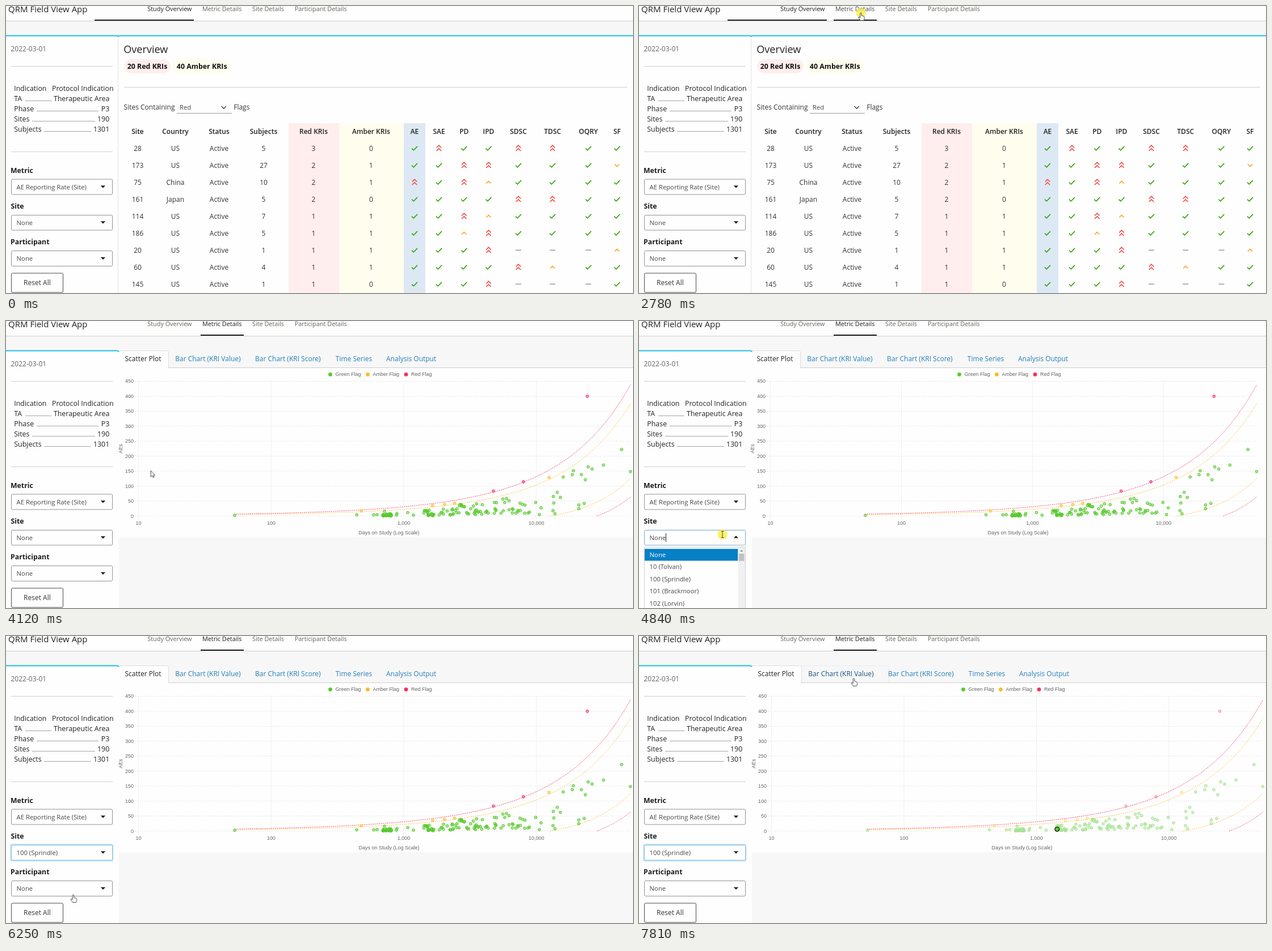
Write an HTML page that moves like this. It is 1105x507 px and loops after 8 s.

```html
<!DOCTYPE html>
<html lang="en">
<head>
<meta charset="utf-8">
<title>Study dashboard</title>
<style>
html, body { margin: 0; width: 100%; height: 100%; overflow: hidden; background: #f7f7f7; }
svg { display: block; width: 1105px; height: 507px; }
text { font-family: "Open Sans", "Noto Sans", sans-serif; font-size: 12px; fill: #333; white-space: pre; }
.nav text { font-size: 10.85px; fill: #63655c; }
.facts text { font-size: 12.4px; fill: #222; }
.label { font-size: 12.3px; font-weight: 700; fill: #1d1d1d; }
.input { font-size: 11.28px; fill: #484848; }
.badge { font-size: 12.4px; font-weight: 700; fill: #111; }
.head { font-weight: 600; fill: #222; }
.tabs text { fill: #2580bd; }
.chart text { font-family: "Liberation Sans", Arial, sans-serif; font-size: 9px; fill: #666; }
.mid { text-anchor: middle; }
.end { text-anchor: end; }
.rule { stroke: #cfcfcf; }
.box { fill: #fefefe; stroke: #929292; }
.icon, .line { fill: none; }
.icon { stroke-width: 1.7; }

.k { animation: 8s step-end infinite; }
@keyframes overview { 0% { opacity: 1 } 39.75%, to { opacity: 0 } }
@keyframes metrics { 0% { opacity: 0 } 39.75%, to { opacity: 1 } }
@keyframes studyLine { 0% { opacity: 1 } 40.625%, to { opacity: 0 } }
@keyframes studyText { 0% { fill: #1d1d1d } 40.625%, to { fill: #63655c } }
@keyframes metricLine { 0% { opacity: 0 } 20.5%, to { opacity: 1 } }
@keyframes metricText { 0% { fill: #63655c } 20.5% { fill: #45463f } 40.625%, to { fill: #1d1d1d } }
@keyframes wide { 0% { opacity: 0 } 40.625% { opacity: 1 } 60.5% { opacity: 0 } 78.125% { opacity: 1 } 80.625%, to { opacity: 0 } }
@keyframes data { 0% { opacity: 0 } 42.25%, to { opacity: 1 } }
@keyframes open { 0% { opacity: 0 } 60.5% { opacity: 1 } 78.125%, to { opacity: 0 } }
@keyframes picked { 0% { opacity: 0 } 80.625%, to { opacity: 1 } }
@keyframes noSite { 0% { opacity: 1 } 78.125%, to { opacity: 0 } }
@keyframes oneSite { 0% { opacity: 0 } 78.125%, to { opacity: 1 } }
@keyframes closed { 0% { opacity: 1 } 60.5% { opacity: 0 } 78.125%, to { opacity: 1 } }
@keyframes focus { 0% { stroke: #929292 } 60.5% { stroke: #74a9cc } 61.25%, to { stroke: #86bfe4 } }
@keyframes glow { 0% { opacity: 0 } 61.25%, to { opacity: 1 } }
@keyframes caret { 0% { opacity: 0 } 60.5% { opacity: 1 } 67.1% { opacity: 0 } 73.7% { opacity: 1 } 78.125%, to { opacity: 0 } }
@keyframes shift { 0% { transform: none } 60.5% { transform: translate(-2px, 0) } 78.125%, to { transform: none } }
@keyframes hover { 0% { fill: #2580bd } 95.125%, to { fill: #1b5487 } }
@keyframes hoverBox { 0% { opacity: 0 } 95.125%, to { opacity: 1 } }
@keyframes click {
  0% { opacity: 0 } 34.75% { opacity: 1 } 39.75% { opacity: 0 } 58.5% { opacity: 1 }
  62.125% { opacity: 0 } 75.625% { opacity: 1 } 78.125%, to { opacity: 0 }
}
@keyframes arrow {
  0% { opacity: 0 } 10.5% { opacity: 1 } 18.5% { opacity: 0 } 49% { opacity: 1 }
  57% { opacity: 0 } 86.25% { opacity: 1 } 94.75%, to { opacity: 0 }
}
@keyframes hand {
  0% { opacity: 0 } 18.5% { opacity: 1 } 49% { opacity: 0 } 65.5% { opacity: 1 }
  86.25% { opacity: 0 } 94.75%, to { opacity: 1 }
}
@keyframes beam { 0% { opacity: 0 } 57% { opacity: 1 } 65.5%, to { opacity: 0 } }
#cursor { animation: path 8s linear infinite; }
@keyframes path {
  0%, 10.5% { transform: translate(963px, 495px) }
  14% { transform: translate(690px, 230px) }
  17% { transform: translate(440px, 45px) }
  18.875% { transform: translate(395.5px, 15.5px) }
  20.5%, 21.25% { transform: translate(393px, 14px) }
  22.25%, 48% { transform: translate(391px, 12px) }
  51.5% { transform: translate(255.5px, 264px) }
  54% { transform: translate(183px, 345px) }
  57.625%, 63.875% { transform: translate(147px, 377px) }
  68.125%, 71.5% { transform: translate(139px, 442px) }
  75.625%, 85.625% { transform: translate(118.5px, 457px) }
  89.5% { transform: translate(640px, 385px) }
  91% { transform: translate(812px, 300px) }
  93.8% { transform: translate(415px, 168px) }
  95.125%, 96.5% { transform: translate(421px, 77px) }
  97.625%, to { transform: translate(378.5px, 75px) }
}
</style>
</head>
<body>
<svg viewBox="0 0 1105 507">
  <rect width="1105" height="507" fill="#f7f7f7"/>

  <g class="nav">
    <rect width="1105" height="26" fill="#fefefe"/>
    <path class="rule" d="M0 26.7H1105"/>
    <text x="4" y="11" style="font-size:15px;fill:#222">QRM Field View App</text>
    <text class="k" style="animation-name:studyText" x="249.3" y="9">Study Overview</text>
    <text class="k" style="animation-name:metricText" x="346" y="9">Metric Details</text>
    <text x="434" y="9">Site Details</text>
    <text x="508.8" y="9">Participant Details</text>
    <rect class="k" style="animation-name:studyLine" x="156" y="24" width="175" height="2" fill="#1d1d1d"/>
    <rect class="k" style="animation-name:metricLine" x="343" y="24" width="76" height="2" fill="#1d1d1d"/>
  </g>

  <g class="k" style="animation-name:metrics">
    <g class="tabs k" style="animation-name:shift">
      <path class="rule" d="M286 82.5H1110"/>
      <path d="M199 83V53H283q3 0 3 3V83Z" fill="#fefefe"/>
      <path class="line" stroke="#ddd" d="M199 52.5H283.5q3 0 3 3V82"/>
      <path class="line k" style="animation-name:hoverBox" stroke="#ececec" d="M287 52.5H437q3 0 3 3V82"/>
      <text x="209.5" y="71.3" style="fill:#222">Scatter Plot</text>
      <text class="k" style="animation-name:hover" x="298.2" y="71.3">Bar Chart (KRI Value)</text>
      <text x="439" y="71.3">Bar Chart (KRI Score)</text>
      <text x="580.8" y="71.3">Time Series</text>
      <text x="670" y="71.3">Analysis Output</text>
    </g>
  </g>

  <g id="sidebar">
    <path d="M0 52H196q3 0 3 3V507H0Z" fill="#fefefe"/>
    <path class="line" stroke="#1fbfe2" stroke-width="2" d="M0 52.6H196q2 0 3 2"/>
    <text x="8.5" y="79.6" style="fill:#666">2022-03-01</text>
    <path class="rule" d="M9 106.5H188M9 257.5H188"/>
    <g class="facts" id="facts"></g>
    <text class="label" x="8" y="294.6">Metric</text>
    <text class="label" x="8.5" y="358">Site</text>
    <text class="label" x="8" y="421.4">Participant</text>
    <rect class="k" style="animation-name:glow" x="7.3" y="367.3" width="182" height="31" rx="3.5" fill="#bfe1f4"/>
    <rect class="box" x="9.5" y="306" width="178" height="27" rx="2"/>
    <rect class="box k" style="animation-name:focus" x="9.5" y="369.5" width="178" height="26.5" rx="2"/>
    <rect class="box" x="9.5" y="432.5" width="178" height="27" rx="2"/>
    <rect class="box" x="9.5" y="472" width="91" height="34" rx="2" style="stroke:#4a4a4a"/>
    <text class="mid" x="54.9" y="493.3">Reset All</text>
    <text class="input" x="18.6" y="323.6">AE Reporting Rate (Site)</text>
    <text class="input k" style="animation-name:noSite" x="18.6" y="386.6">None</text>
    <text class="input k" style="animation-name:oneSite" x="18.6" y="386.6">100 (Sprindle)</text>
    <text class="input" x="18.6" y="450">None</text>
    <g fill="#1d1d1d">
      <path d="M166.8 317.3h8.4L171 321.6Z"/>
      <path class="k" style="animation-name:closed" d="M166.8 380.3h8.4L171 384.6Z"/>
      <path class="k" style="animation-name:open" d="M166.8 383.6h8.4L171 379.3Z"/>
      <path d="M166.8 443.7h8.4L171 448Z"/>
    </g>
    <path class="k" style="animation-name:caret" d="M47.5 375V390" stroke="#222"/>
    <g class="k" style="animation-name:open" id="menu">
      <rect x="9.5" y="399.5" width="178" height="115" fill="#fefefe" stroke="#cfcfcf"/>
      <rect x="10" y="402.5" width="164.5" height="21" fill="#0780c5"/>
      <rect x="174.5" y="400" width="12.5" height="107" fill="#f1f1f1"/>
      <rect x="176" y="411" width="9.5" height="13" fill="#c1c1c1"/>
      <path d="M178.3 407.2h5L180.8 404.4Z" fill="#777"/>
    </g>
  </g>

  <g class="k" style="animation-name:metrics" id="charts"></g>

  <g class="k" style="animation-name:overview" id="overview">
    <path d="M197 507V56q0-4 4-4H1105V507Z" fill="#fefefe"/>
    <path d="M197.5 56V507" stroke="#e2e2e2"/>
    <path class="line" stroke="#1fbfe2" stroke-width="2" d="M197 54.6q1-2 4-2H1105"/>
    <text x="207.2" y="82.6" style="font-size:18.1px;fill:#222">Overview</text>
    <rect x="208" y="94" width="82" height="25" rx="12.5" fill="#ffeeed"/>
    <rect x="294" y="94" width="102" height="25" rx="12.5" fill="#fffdee"/>
    <text class="badge mid" x="249" y="110.6">20 Red KRIs</text>
    <text class="badge mid" x="345.2" y="110.6">40 Amber KRIs</text>
    <path class="rule" d="M208 143.5H1095"/>
    <text x="207.6" y="183">Sites Containing</text>
    <text class="input" x="306" y="183">Red</text>
    <path d="M301 189.5H398" stroke="#999"/>
    <path class="line" d="M379.5 177l4.2 4.2 4.2-4.2" stroke="#444" stroke-width="1.4"/>
    <text x="401.2" y="183">Flags</text>
    <rect x="498" y="207" width="89" height="300" fill="#ffeeed"/>
    <rect x="587" y="207" width="114" height="300" fill="#fffdee"/>
    <rect x="701" y="207" width="38" height="300" fill="#dce9f5"/>
  </g>

  <g id="cursor">
    <circle class="k" style="animation-name:click" r="8.7" fill="#f8ee3a" fill-opacity=".75"/>
    <path class="k" style="animation-name:arrow" d="M0 0V11L2.6 8.6 4.2 12.2 5.9 11.4 4.3 8H7.5Z" fill="#fff" stroke="#333" stroke-width=".9"/>
    <path class="k" style="animation-name:hand" d="M-1.2 1.2q0-1.2 1.2-1.2t1.2 1.2V5l2.7.6q2.2.5 2.2 2V9.5q0 2-1.2 4H-1L-4 9q-.7-1.6.8-1.7L-1.2 8.6Z" fill="#fff" stroke="#333" stroke-width=".9"/>
    <path class="k line" style="animation-name:beam" d="M-2.5-5.5H2.5M0-5.5V5.5M-2.5 5.5H2.5" stroke="#444"/>
  </g>
</svg>

<script>
const $ = id => document.getElementById(id);
const add = (id, markup) => $(id).insertAdjacentHTML('beforeend', markup);
const text = (x, y, str, cls = '') => `<text class="${cls}" x="${x}" y="${y}">${str}</text>`;

// Study facts: name, value, leader start and end
[['Indication', 'Protocol Indication', 0, 0, 189.5], ['TA', 'Therapeutic Area', 34, 80], ['Phase', 'P3', 54, 163],
 ['Sites', '190', 46, 157], ['Subjects', '1301', 67, 150]].forEach(([name, value, a, b, right = 182.3], i) => {
  const y = 150.4 + i * 18;
  add('facts', text(14.3, y, name) + text(right, y, value, 'end') +
    `<path d="M${a} ${Math.floor(y) - .5}H${b}" stroke="#a5a5a5"/>`);
});

['None', '10 (Tolvan)', '100 (Sprindle)', '101 (Brackmoor)', '102 (Lorvin)'].forEach((name, i) =>
  add('menu', `<text class="input" x="18.6" y="${417 + i * 21.4}"${i ? '' : ' style="fill:#fff"'}>${name}</text>`));

// Overview table
const heads = ['Site', 'Country', 'Status', 'Subjects', 'Red KRIs', 'Amber KRIs', 'AE', 'SAE', 'PD', 'IPD', 'SDSC', 'TDSC', 'OQRY', 'SF'];
const cols = [232, 298.5, 375.5, 454, 542, 643.5, 720, 763, 807.3, 850.5, 903, 963.2, 1026.4, 1077];
const icons = {
  c: ['#3aa812', 'M-5 .3L-1.6 3.6 5-3.4'],
  u: ['#f4524d', 'M-4.3-.8L0-5 4.3-.8M-4.3 4.7L0 .5 4.3 4.7'],
  a: ['#f7a823', 'M-4 2.2L0-1.8 4 2.2'],
  d: ['#f7a823', 'M-4-1.8L0 2.2 4-1.8'],
  n: ['#a5a5a5', 'M-5 0H5']
};
heads.forEach((h, i) => add('overview', text(cols[i], 226.2, h, 'head mid')));
['28 US 5 3 0 cuccuucc', '173 US 27 2 1 ccuucccd', '75 China 10 2 1 ucuacccc', '161 Japan 5 2 0 ccccuucc',
 '114 US 7 1 1 ccuacccc', '186 US 5 1 1 ccaucccc', '20 US 1 1 1 cccunnna', '60 US 4 1 1 ccccuacc',
 '145 US 1 1 0 cccunnnc'].forEach((line, row) => {
  const [site, country, count, red, amber, flags] = line.split(' ');
  const y = 251.3 + row * 30;
  [site, country, 'Active', count, red, amber].forEach((v, i) => add('overview', text(cols[i], y + 4.3, v, 'mid')));
  [...flags].forEach((f, i) => add('overview',
    `<path class="icon" stroke="${icons[f][0]}" d="${icons[f][1]}" transform="translate(${cols[i + 6]} ${y})"/>`));
});

// Scatter plot
const GREEN = '#58c92e', AMBER = '#fdbb2b', RED = '#f5305f';
const LEFT = 233.5, DECADE = 233.73, ZERO = 344.5, UNIT = 0.5289;
const RATE = 0.00489, SIGMA = 0.2755, LAST = 51470;

let seed = 1234567;
const rnd = () => (seed = seed * 16807 % 2147483647) / 2147483647;

const dots = [];
const put = (color, list) => {
  for (let i = 0; i < list.length; i += 2) dots.push([color, list[i], list[i + 1]]);
};
// count, x range, y range; denser towards the axis
[[22, 664, 680, 340.5, 344.3], [18, 736, 757, 333, 344], [15, 758, 798, 331, 343],
 [24, 798, 842, 323, 342], [23, 843, 912, 320, 341], [4, 912, 936, 323, 340]].forEach(([n, x0, x1, y0, y1]) => {
  while (n--) dots.push([GREEN, x0 + rnd() * (x1 - x0), y1 - rnd() ** 1.4 * (y1 - y0)]);
});
put(GREEN, [403, 343.3, 618, 342.3, 648, 342.5, 654, 342, 667, 336, 689, 340, 688, 343, 708, 338.5, 718, 343,
  875.5, 314.5, 882, 313.5, 886.5, 317.5, 933.5, 320.5, 943, 330, 940, 342, 964, 335, 967.5, 340.3,
  965.5, 321.5, 964.5, 310, 971.5, 302.7, 977, 311.7, 982, 275.5, 998, 271.5, 1000, 264.5, 1014, 271.5,
  1021, 280.5, 1026, 257.7, 1033, 261.5, 1053, 254.5, 1085, 227, 1100.5, 266, 1009.5, 325, 1009.5, 331.5, 1019, 322.3]);
put(AMBER, [626, 335.4, 752, 326, 773, 324, 790.5, 322, 957, 276.3]);
put(RED, [859, 300.4, 912, 284, 1024.5, 133]);

function chart({ name, left = LEFT, decade = DECADE, move = 0, picked = false }) {
  const px = d => left + decade * (Math.log10(d) - 1);
  const fit = x => left + (x - LEFT) * decade / DECADE;
  const py = v => ZERO - v * UNIT;
  const dx = left - LEFT;
  let out = `<rect x="199" y="83" width="906" height="299" fill="#fefefe"/>`;

  [[571.5, 'Green', GREEN], [637.5, 'Amber', AMBER], [705, 'Red', RED]].forEach(([x, label, color]) => {
    out += `<circle cx="${x + move}" cy="94.4" r="3.4" fill="${color}"/>` + text(x + move + 9, 97.3, label + ' Flag');
  });
  let grid = '';
  for (let v = 0; v <= 450; v += 50) {
    grid += `M${left - 6} ${py(v)}H${px(LAST)}`;
    out += text(225 + dx, py(v) + 3, v, 'end');
  }
  [10, 100, 1000, 10000].forEach(d => {
    grid += `M${px(d)} 106.5V351`;
    out += text(px(d), 360.3, d.toLocaleString('en-US'), 'mid');
  });
  out += `<path class="line" stroke="#e4e4e4" stroke-dasharray="2 2" d="${grid}"/>`;
  out += text(675 + move, 376.5, 'Days on Study (Log Scale)', 'mid');
  out += `<text class="mid" transform="translate(${205.3 + dx} 225.5) rotate(-90)">AEs</text>`;

  let data = '';
  [[3, RED], [2, AMBER], [-2, AMBER], [-3, RED]].forEach(([z, color]) => {
    const first = z > 0 ? 53 : (z * SIGMA / RATE) ** 2;
    const pts = [];
    for (let i = 0; i <= 80; i++) {
      const d = first * (LAST / first) ** (i / 80);
      pts.push(px(d).toFixed(1) + ',' + py(RATE * d + z * SIGMA * Math.sqrt(d)).toFixed(1));
    }
    data += `<polyline class="line" stroke="${color}" stroke-dasharray="1.7 1.7" points="${pts.join(' ')}"/>`;
  });
  data += `<g opacity="${picked ? .5 : 1}">` + dots.map(([color, x, y]) =>
    `<circle cx="${fit(x).toFixed(1)}" cy="${y.toFixed(1)}" r="2.4" fill="${color}" fill-opacity=".5" stroke="${color}"/>`).join('') + '</g>';
  if (picked) data += `<circle cx="736.8" cy="341.2" r="3.8" fill="${GREEN}" stroke="#111" stroke-width="1.4"/>`;

  add('charts', `<g class="chart k" style="animation-name:${name}">${out}<g class="k" style="animation-name:data">${data}</g></g>`);
}

chart({ name: 'wide' });
chart({ name: 'open', left: 231.5, decade: 231, move: -7 });
chart({ name: 'picked', decade: 233.44, picked: true });
</script>
</body>
</html>
```
